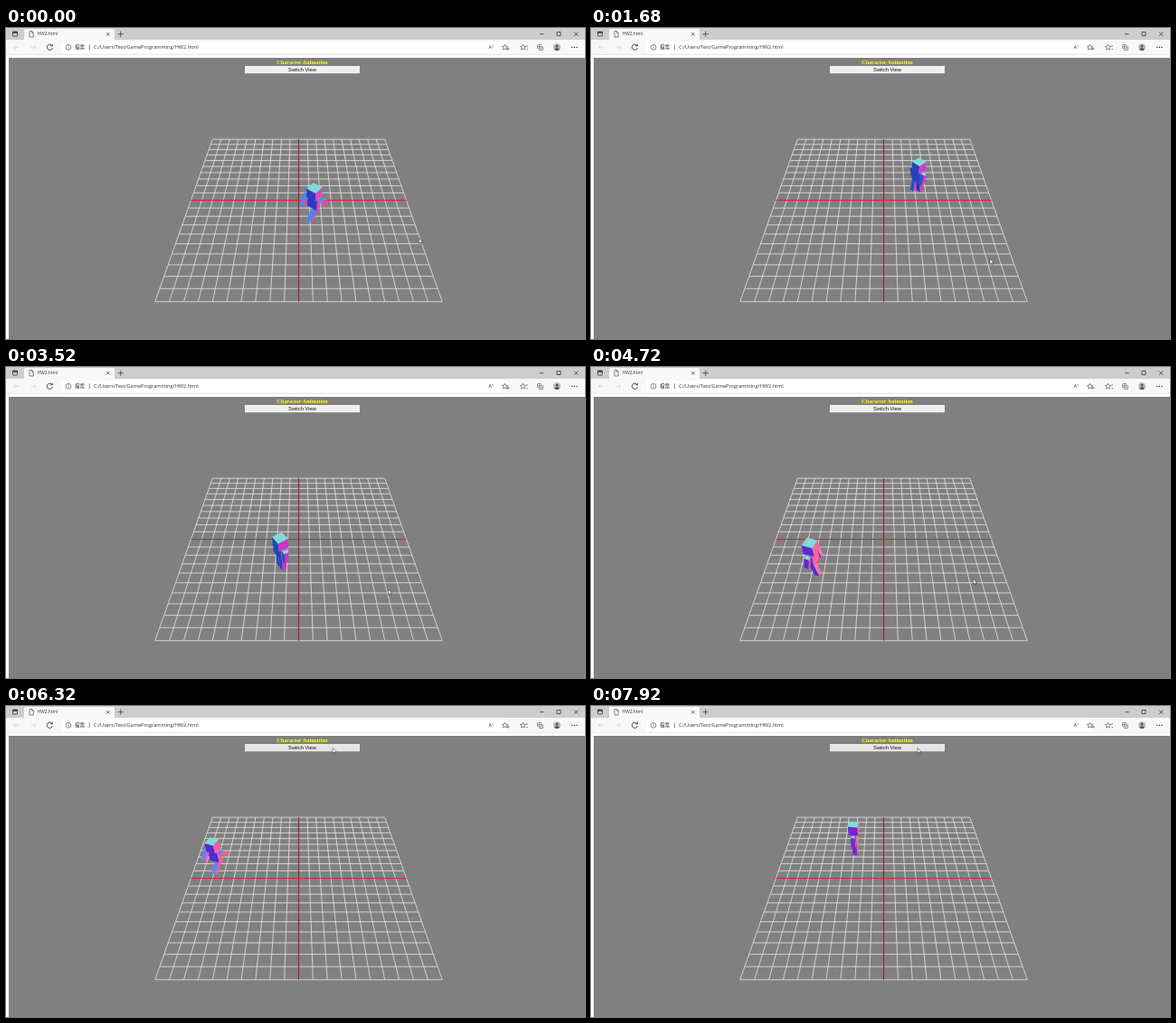
Write an HTML page with a canvas that moves like this. It is 640 px wide and 344 px high and loops after 8 s.

```html
<!DOCTYPE html>
<html lang="en">
<head>
<meta charset="utf-8">
<title>HW2.html</title>
<style>
  html, body { margin: 0; width: 100%; height: 100%; overflow: hidden; background: #fff; }
  canvas, svg { position: absolute; left: 0; top: 0; width: 640px; height: 344px; }
  .ui { font-family: "Open Sans", "Noto Sans CJK TC", "Noto Sans CJK", sans-serif; fill: #333; }
  .icon { fill: none; stroke: #555; stroke-width: .7; }
  .title { font: bold 6.2px "Liberation Serif", serif; fill: #ff0; }
  .label { font: 5.75px "Liberation Sans", sans-serif; fill: #111; }
</style>
</head>
<body>
<canvas id="scene" width="640" height="344"></canvas>
<svg viewBox="0 0 640 344">
  <rect width="640" height="13" fill="#cdcdcd"/>
  <path d="M20 13V3q0-2 2-2h96q2 0 2 2v10z" fill="#f8f8f8"/>
  <rect y="13" width="640" height="17" fill="#f8f8f8"/>
  <rect x="61" y="15" width="493" height="13" rx="2" fill="#fff"/>
  <rect y="29.5" width="640" height=".5" fill="#ddd"/>
  <g class="icon">
    <rect x="7.5" y="4" width="5" height="5" rx=".6" stroke="#222"/>
    <path d="M7.5 5h5" stroke="#222" stroke-width="1.4"/>
    <path d="M26 3.5h2.5l1.7 1.7v4.8H26zM28.5 3.5v1.7h1.7"/>
    <path d="M111 5l3.6 3.6m0-3.6L111 8.6M123.5 6.7h6.4m-3.2-3.2v6.4" stroke="#333"/>
    <path d="M590 6.7h4.5M609 4.5h4v4h-4zM628 4.5l4.4 4.4m0-4.4l-4.4 4.4" stroke="#222"/>
    <path d="M14 21.3H8.5l2.6-2.6m-2.6 2.6l2.6 2.6M27.5 21.3H33l-2.6-2.6m2.6 2.6l-2.6 2.6" stroke="#ccc"/>
    <path d="M51 19.6a3.1 3.1 0 1 0 .4 2.4M51.3 17.8v2h-2" stroke="#333" stroke-width=".9"/>
    <circle cx="69" cy="21.3" r="2.9"/><path d="M69 20.8v2M69 19.4v.6M92.3 18.3v6"/>
    <path id="star" d="M551.5 18.2l.9 2 2.2.2-1.6 1.5.4 2.2-1.9-1.1-1.9 1.1.4-2.2-1.6-1.5 2.2-.2z"/>
    <use href="#star" x="20"/>
    <path d="M553.5 23h3m-1.5-1.5v3M575 20h2m-1.5 3.5h1.5"/>
    <rect x="587.5" y="18.5" width="4.3" height="4.3" rx="1"/>
    <path d="M589 24.4h4.3v-4M589.6 19.5v2.4m-1.2-1.2h2.4"/>
  </g>
  <circle cx="609" cy="21.3" r="4" fill="#bbb"/>
  <circle cx="609" cy="20" r="1.5" fill="#555"/><path d="M606.2 23.8q2.8-3.5 5.6 0-2.8 2.6-5.6 0" fill="#555"/>
  <path d="M625.2 21.3h1.2m1.4 0h1.2m1.4 0h1.2" stroke="#333" stroke-width="1.2"/>
  <g class="ui">
    <text x="34.5" y="8.4" font-size="4.95">HW2.html</text>
    <text x="76" y="23.3" font-size="5.5">檔案</text>
    <text x="97" y="23.2" font-size="5.6">C:/Users/Test/GameProgramming/HW2.html</text>
    <text x="533.5" y="23.3" font-size="5.5">A</text><text x="537.4" y="21" font-size="3.6">»</text>
  </g>
  <text class="title" x="327.5" y="40.3" text-anchor="middle">Character Animation</text>
  <rect id="button" x="264" y="42" width="127" height="8.2" fill="#efefef"/>
  <text class="label" x="327.5" y="48" text-anchor="middle">Switch View</text>
  <path id="cursor" d="M0 0v5.8l1.4-1.2 1 2.1.9-.4-1-2.1h1.9z" fill="#fff" stroke="#222" stroke-width=".5"/>
</svg>
<script>
const LOOP = 8, SPEED = 3.8, S = Math.SQRT1_2, DIST = 20 / S, FOCAL = 336.7;
const ctx = document.getElementById('scene').getContext('2d');
const cursor = document.getElementById('cursor');
const button = document.getElementById('button');

// walking route: time, x, z, heading
const route = [
  [0, 1.27, 2.01, -.9], [1, 3.9, -.7, -.95], [1.35, 4.1, -2, -2.4],
  [1.68, 3.15, -1.4, 2.42], [3.52, -1.44, 3.25, 2.53], [4.72, -5.65, 3.79, 3.45],
  [5.68, -7.78, 1.13, -1.87], [6.96, -6.21, -3.08, -.7], [8, -2.54, -3.7, .1]
];
// pointer: time, x, y
const pointer = [
  [0, 456.5, 232.5], [.96, 456.5, 232.5], [1.6, 441, 255.5], [1.84, 441, 255.5],
  [2.5, 422.5, 246], [4.48, 422.5, 246], [4.7, 422.5, 234.5], [4.85, 422.5, 234.5],
  [5.28, 354, 247], [5.6, 361, 46.5], [8, 361, 46.5]
];

function segment(keys, t) {
  let i = 0;
  while (i < keys.length - 2 && t >= keys[i + 1][0]) i++;
  const a = keys[i], b = keys[i + 1], span = b[0] - a[0];
  return { a, b, span, u: (t - a[0]) / span };
}

function position(t) {
  const { a, b, span, u } = segment(route, t), k = span * SPEED;
  const axis = (i, fn) => {
    const m = k * fn(a[3]), n = k * fn(b[3]), d = b[i] - a[i];
    const c2 = 3 * d - 2 * m - n, c3 = m + n - 2 * d;
    return [a[i] + u * (m + u * (c2 + u * c3)), m + u * (2 * c2 + 3 * u * c3)];
  };
  const [x, dx] = axis(1, Math.cos), [z, dz] = axis(2, Math.sin);
  return { x, z, heading: Math.atan2(dz, dx) };
}

const add = (p, v, k) => p.map((c, i) => c + v[i] * k);
const depth = p => DIST - S * (p[1] + p[2]);
function project(p) {
  const k = FOCAL / depth(p);
  return [323.5 + p[0] * k, 190.5 - S * (p[1] - p[2]) * k];
}

function line(p, q, color, width) {
  ctx.strokeStyle = color;
  ctx.lineWidth = width;
  ctx.beginPath();
  ctx.moveTo(...project(p));
  ctx.lineTo(...project(q));
  ctx.stroke();
}

function drawGrid() {
  for (let i = -10; i <= 10; i++) {
    if (!i) continue;
    line([i, 0, -10], [i, 0, 10], '#e6e6e6', .8);
    line([-10, 0, i], [10, 0, i], '#e6e6e6', .8);
  }
  line([0, 0, -10], [0, 0, 10], '#961a2c', 1);
  line([-10, 0, 0], [10, 0, 0], '#dc1e32', 1);
}

// box faces are coloured by their normal as seen from the camera
function drawBox({ center, axes, size }) {
  for (let i = 0; i < 3; i++) for (const sign of [-1, 1]) {
    const n = axes[i].map(c => c * sign);
    const mid = add(center, n, size[i] / 2);
    if (n[0] * -mid[0] + n[1] * (20 - mid[1]) + n[2] * (20 - mid[2]) <= 0) continue;
    const j = (i + 1) % 3, k = (i + 2) % 3;
    const view = [n[0], S * (n[1] - n[2]), S * (n[1] + n[2])];
    ctx.fillStyle = `rgb(${view.map(c => Math.round(127.5 + 127.5 * c))})`;
    ctx.beginPath();
    for (const [p, q] of [[-1, -1], [1, -1], [1, 1], [-1, 1]])
      ctx.lineTo(...project(add(add(mid, axes[j], p * size[j] / 2), axes[k], q * size[k] / 2)));
    ctx.fill();
  }
}

function drawWalker(t) {
  const { x, z, heading } = position(t);
  const c = Math.cos(heading), s = Math.sin(heading);
  const fwd = [c, 0, s], up = [0, 1, 0], right = [-s, 0, c];
  const swing = .8 * Math.sin(5 * (t - 3.52));
  const part = (side, top, size, angle = 0) => {
    const ca = Math.cos(angle), sa = Math.sin(angle);
    const upward = add(up.map(v => v * ca), fwd, -sa);
    const ahead = add(fwd.map(v => v * ca), up, sa);
    const pivot = add([x, top, z], right, side);
    return { center: add(pivot, upward, -size[1] / 2), axes: [ahead, upward, right], size };
  };
  const boxes = [part(0, 3.4, [.9, .95, .9]), part(0, 2.45, [.5, 1.2, 1])];
  for (const side of [-1, 1]) {
    boxes.push(part(side * .68, 2.4, [.38, 1.15, .36], side * swing));
    boxes.push(part(side * .24, 1.27, [.42, 1.27, .42], -side * swing));
  }
  boxes.sort((a, b) => depth(b.center) - depth(a.center)).forEach(drawBox);
}

function frame(now) {
  const t = now / 1000 % LOOP;
  ctx.fillStyle = '#fff';
  ctx.fillRect(0, 0, 640, 344);
  ctx.fillStyle = '#808080';
  ctx.fillRect(3, 33, 637, 311);
  drawGrid();
  drawWalker(t);

  const { a, b, u } = segment(pointer, t);
  const px = a[1] + (b[1] - a[1]) * u, py = a[2] + (b[2] - a[2]) * u;
  cursor.setAttribute('transform', `translate(${px} ${py})`);
  button.setAttribute('fill', py < 50 ? '#e5e5e5' : '#efefef');
  requestAnimationFrame(frame);
}
requestAnimationFrame(frame);
</script>
</body>
</html>
```
